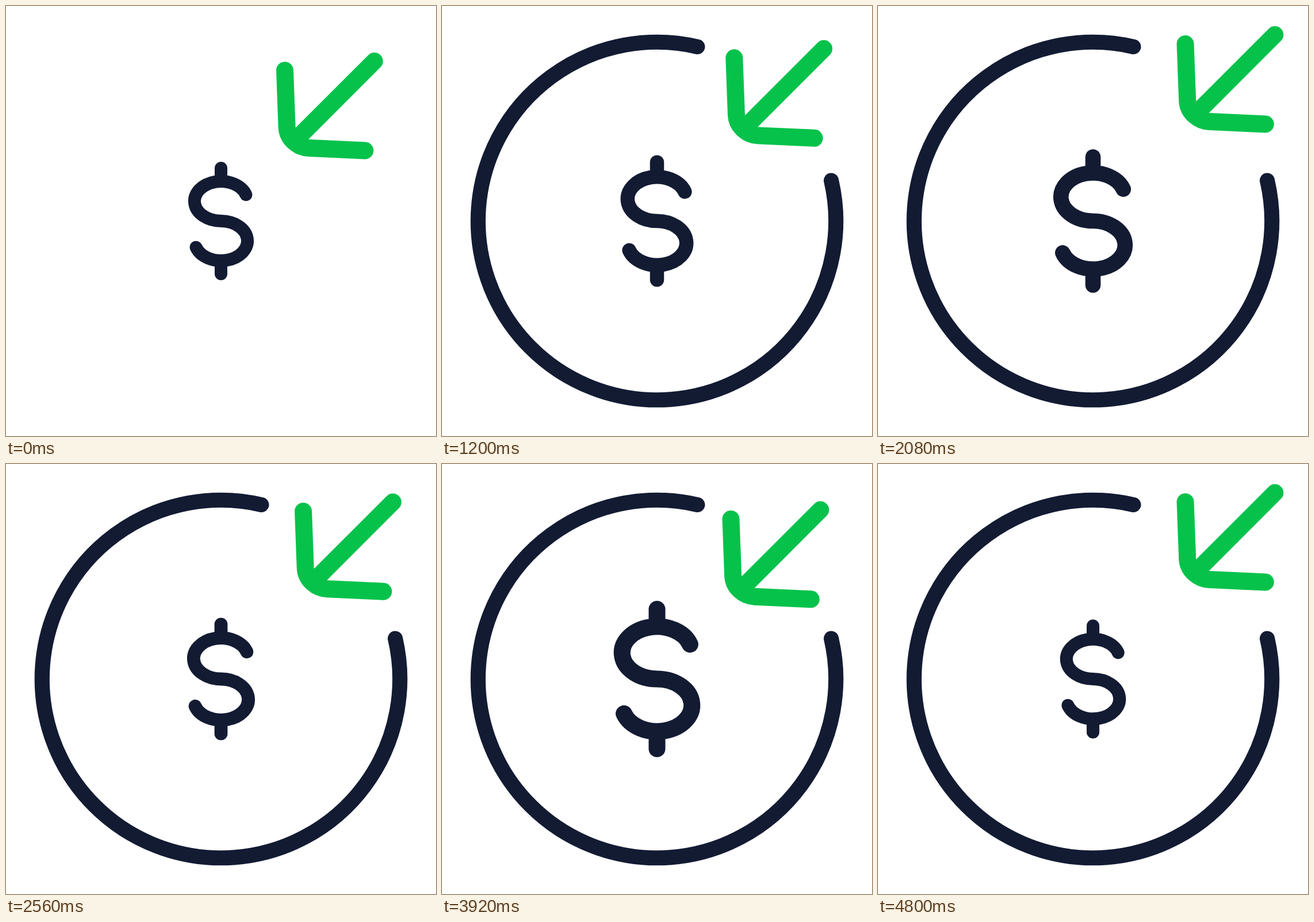
An HTML page for the animation above (4.88 s loop, 748 by 748 pixels).

```html
<!DOCTYPE html>
<html lang="en">
<head>
<meta charset="utf-8">
<title>Incoming payment icon</title>
<style>
  html, body { margin: 0; height: 100%; overflow: hidden; background: #fff; }
  svg { display: block; width: 100%; height: 100%; fill: none; stroke: #131b33; stroke-linecap: round; stroke-linejoin: round; }
</style>
</head>
<body>
<svg viewBox="0 0 748 748">
  <path id="ring" stroke-width="26.2" pathLength="1" d="M677.1 303.6A311.2 311.2 0 1 1 444.4 70.9"/>
  <path id="dollar" stroke-width="22" d="M43.5 -45.7A46 34.5 0 1 0 0 0A46 34.5 0 1 1 -43.5 45.7M0 -92V-71M0 71V92"/>
  <path id="arrow" stroke="#06c24b" stroke-width="30" d="M640.8 96L506 230.8M485 112L488.7 212C490 231 507 246 526.5 247L624.3 251.5"/>
</svg>
<script>
const LOOP = 4880, STEP = 80;
const [ring, dollar, arrow] = ['ring', 'dollar', 'arrow'].map(id => document.getElementById(id));

const clamp = x => Math.min(1, Math.max(0, x));
const smooth = x => x * x * (3 - 2 * x);

// 0 until start, then up and down between 0 and 1
const swing = (t, start, half) => {
  const n = Math.max(0, t - start) / half % 2;
  return n < 1 ? n : 2 - n;
};

// cubic-bezier(.333, 0, .833, .833): soft start, linear finish
const softStart = x => {
  let s = x;
  for (let i = 0; i < 6; i++) s -= (s + (s * s - s ** 3) / 2 - x) / (1 + s - 1.5 * s * s);
  return 2.5 * s * s - 1.5 * s ** 3;
};

function draw(t) {
  const drawn = smooth(clamp(t / 640));
  ring.style.display = drawn ? '' : 'none';
  ring.setAttribute('stroke-dasharray', `${drawn} 2`);

  const scale = 1 + 0.352 * softStart(swing(t, 720, 1040));
  dollar.setAttribute('transform', `translate(374 374) scale(${scale})`);

  const away = swing(t, 560, 1440);
  arrow.setAttribute('transform', `translate(${52.5 * away} ${-48.7 * away})`);
}

function tick() {
  const t = performance.now() % LOOP;
  draw(Math.floor(t / STEP) * STEP);
  requestAnimationFrame(tick);
}
tick();
</script>
</body>
</html>
```
